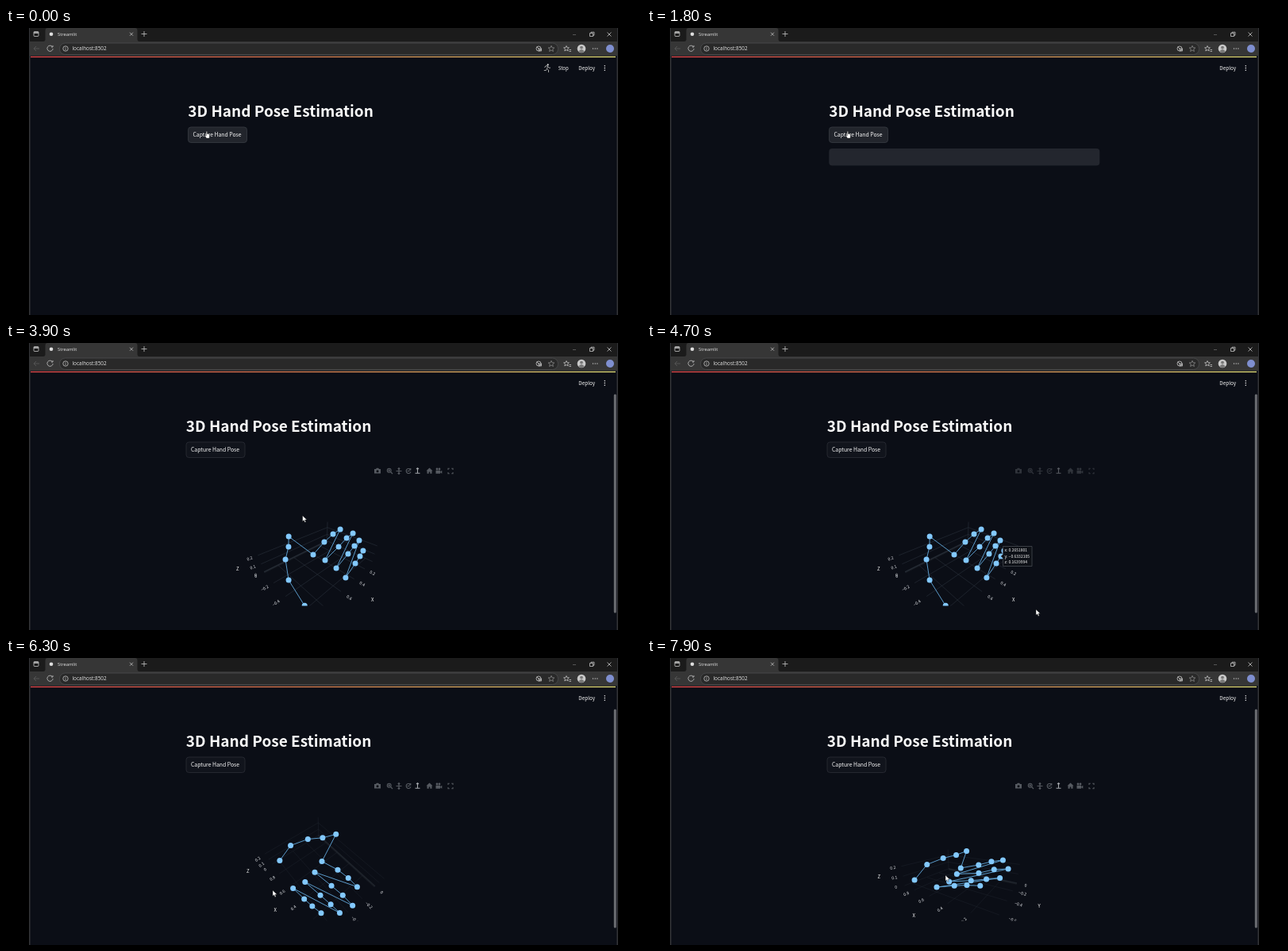
These frames come from a looping animation (800 px wide and 362 px high, 8 s). An HTML page:

```html
<!DOCTYPE html>
<html lang="en">
<head>
<meta charset="utf-8">
<title>3D Hand Pose Estimation</title>
<style>
  html, body { margin: 0; width: 100%; height: 100%; overflow: hidden; background: #000; }
  svg { display: block; width: 800px; height: 362px; }
  text { font-family: "Noto Sans CJK JP", "Noto Sans CJK SC", "Noto Sans CJK", "Open Sans", sans-serif; fill: #fafafa; }
  .ui { font-family: "Open Sans", "Noto Sans", sans-serif; font-size: 5.8px; fill: #e4e4e4; }
  .line { fill: none; stroke: #c4c4c4; stroke-width: .8; }
  .bar .line { stroke: #565a61; stroke-width: 1.1; }
  .bar .solid { fill: #565a61; }
  .tick { font-size: 5.2px; text-anchor: middle; fill: #e4e6ea; }
  .axis { font-size: 6px; text-anchor: middle; }
  .tip text { font-size: 5px; font-weight: 500; }
</style>
</head>
<body>
<svg viewBox="0 0 800 362">
  <defs>
    <linearGradient id="rainbow">
      <stop offset="0" stop-color="#e8494b"/>
      <stop offset=".5" stop-color="#e08552"/>
      <stop offset="1" stop-color="#e6e278"/>
    </linearGradient>
    <clipPath id="scene"><rect x="264" y="201" width="266" height="130.5"/></clipPath>
  </defs>

  <rect width="800" height="362"/>
  <rect x="29" width="742" height="362" fill="#343538"/>
  <rect x="30" width="740" height="18" fill="#1b1b1b"/>
  <rect x="30" y="17" width="740" height="18" fill="#363636"/>
  <path d="M47 17q2.500 0 2.500-3V3q0-3 3-3h110q3 0 3 3v11q0 3 2.500 3z" fill="#363636"/>
  <rect x="30.500" y="35" width="739" height="327" fill="#0b0e16"/>
  <rect x="31" y="35.800" width="737" height="1.300" fill="url(#rainbow)"/>

  <g class="line">
    <rect x="35" y="4.500" width="6" height="6" rx="1"/>
    <path d="M35 6h6" stroke-width="1.600"/>
    <path d="M156 5.700l4 4m0-4l-4 4M170.500 7.500h7M174 4v7"/>
    <path d="M714 8.500h4" stroke="#666"/>
    <path d="M735.500 6.500h4v4h-4zM737 6.500v-1.300h4v4h-1.500M757.500 5.500l5 5m0-5l-5 5"/>
    <path d="M42 26h-7m3-3l-3 3 3 3" stroke="#5c5c5c"/>
    <path d="M58.300 23.500a3.600 3.600 0 1 0 .8 2.500M59 22v2h-2"/>
  </g>
  <circle cx="57" cy="7.800" r="2.300" fill="#dedede"/>
  <text class="ui" x="65" y="10">Streamlit</text>
  <rect x="67.500" y="19" width="628" height="14.500" rx="7" fill="#292929" stroke="#4c4d4f" stroke-width=".8"/>
  <g class="line">
    <circle cx="75" cy="26" r="3.200"/><path d="M75 25.500v2.200M75 24v.7"/>
    <circle cx="671" cy="26" r="3"/><path d="M668.800 23.800l4.400 4.400M671 26h3.500v3h-3.500z"/>
    <path d="M687 22.300l1.100 2.500 2.700.2-2.100 1.800.7 2.700-2.400-1.500-2.400 1.500.7-2.700-2.100-1.800 2.700-.2z" stroke="#888"/>
    <path d="M706 22.500l1 2.200 2.400.2-1.800 1.600.6 2.400-2.200-1.300-2.200 1.300.6-2.400-1.800-1.600 2.400-.2zM709.500 27.500h2.500m-2.500 2h2.500"/>
  </g>
  <text class="ui" x="83.500" y="28" style="font-size:6.400px">localhost:8502</text>
  <circle cx="725" cy="26" r="5.300" fill="#c9c9c9"/>
  <circle cx="725" cy="24.600" r="1.900" fill="#777"/>
  <path d="M721.300 29.500q3.700-5 7.400 0q-3.700 3-7.400 0z" fill="#777"/>
  <path d="M739.500 26h.01m2.700 0h.01m2.700 0h.01" stroke="#ccc" stroke-width="1.300" stroke-linecap="round"/>
  <circle cx="761" cy="26" r="5" fill="#7f8fd0"/>

  <g id="status">
    <circle cx="682.700" cy="46.400" r="1.100" fill="#ddd"/>
    <path class="line" d="M678.500 50l1.500-2.200 2.700.2-1.200 3.500 2 1.500v3M681.300 51.500l-1 2h-2.500M682.800 48.500l1.200 1.700h2"/>
    <text x="695.700" y="52.700" font-size="6.100" font-weight="500">Stop</text>
  </g>
  <text x="721.300" y="52.700" font-size="6.400" font-weight="500">Deploy</text>
  <path d="M754.300 47.800v.01m0 2.700v.01m0 2.700v.01" stroke="#eee" stroke-width="1.500" stroke-linecap="round"/>
  <rect id="scroll" x="765.800" y="64.500" width="3" height="276" rx="1.500" fill="#6b6d72"/>

  <g id="column">
    <text x="229.300" y="111.700" font-size="19" font-weight="700">3D Hand Pose Estimation</text>
    <rect id="button" x="229.500" y="125" width="74" height="19.500" rx="3.500" stroke-width=".8"/>
    <text x="235.500" y="137.200" font-size="6.850" font-weight="500">Capture Hand Pose</text>
  </g>
  <rect id="skeleton" x="229.300" y="152" width="341" height="21.500" rx="4" fill="#23262e"/>

  <g id="bar" class="bar">
    <path class="solid" d="M464 159h2l.8-1.200h2.400l.8 1.200h2v5.500h-8z"/><circle cx="468" cy="161.700" r="1.500" fill="#0b0e16"/>
    <circle class="line" cx="482.700" cy="160.700" r="2.400"/><path class="line" d="M484.500 162.500l2.500 2.500M481.300 160.700h2.800M482.700 159.300v2.800"/>
    <path class="line" d="M491.500 161.500h7M495 158v7M493.700 159.200l1.300-1.500 1.300 1.500M493.700 163.800l1.300 1.500 1.300-1.500"/>
    <path class="line" d="M509.500 159.500a3 3 0 1 0 .5 3M509.800 158v2h-2M505.500 161.500h3"/>
    <path class="line" style="stroke:#a5a8ad" d="M518.500 157.700v6M515.500 164.300h6M517 159l1.500-1.300 1.500 1.300"/>
    <path class="solid" d="M533.500 157.500l4 3.700h-1v3.500h-2.200v-2.300h-1.600v2.300h-2.200v-3.500h-1z"/>
    <path class="solid" d="M541.500 160.800h5.500v4h-5.500zM547.300 162l2-1.200v4l-2-1.200z"/><circle class="solid" cx="543" cy="159" r="1.400"/><circle class="solid" cx="546" cy="159" r="1.400"/>
    <path class="line" d="M557 160v-1.700h1.700m2.600 0h1.700v1.700m0 3v1.700h-1.700m-2.600 0h-1.700v-1.700"/>
  </g>

  <g id="chart" clip-path="url(#scene)">
    <path id="zero" fill="none" stroke="#181c23" stroke-width="2.500"/>
    <path id="grid" fill="none" stroke="#2c333d" stroke-width=".7"/>
    <polyline id="bones" fill="none" stroke="#62a9dc" stroke-width=".9"/>
  </g>
  <g id="labels" clip-path="url(#scene)"></g>

  <g id="tip" class="tip">
    <path d="M448.500 256.500h36.500v25h-36.500v-10l-2.500-2.500 2.500-2.500z" fill="#0e1117" stroke="#4d5158" stroke-width=".7"/>
    <text x="450.500" y="263">x: 0.2651801</text>
    <text x="450.500" y="270.700">y: −0.6332105</text>
    <text x="450.500" y="278.300">z: 0.1639994</text>
  </g>

  <path id="hand" d="M252.200 130.500q.9-.6 1.300.4v2.500l2.300.6q.9.300.8 1.300l-.5 3.700h-3.600l-1.900-3q0-1 1-.6l.6.5z" fill="#fff" stroke="#111" stroke-width=".4"/>
  <path id="arrow" d="M0 0v7.300l1.700-1.500 1.200 2.700 1.300-.5-1.200-2.700h2.400z" fill="#fff" stroke="#111" stroke-width=".4"/>
</svg>

<script>
const LOOP = 8000, STEP = 100;
const $ = id => document.getElementById(id);
const rad = Math.PI / 180, half = Math.SQRT1_2;

// 21 joints: right, toward viewer, up; thousandths of the eye distance
const hand = [
  [-99, 402, -82], [-202, 295, 24], [-252, 140, 68], [-255, 9, 94], [-273, -102, 128],
  [-66, -1, 12], [28, -132, 59], [110, -203, 103], [181, -255, 128],
  [32, 50, -7], [154, -91, 34], [232, -168, 80], [299, -227, 101],
  [116, 121, -30], [226, -14, 11], [292, -92, 41], [345, -151, 65],
  [174, 211, -40], [261, 102, 1], [311, 35, 21], [353, -31, 31]
];

// time, yaw, pitch, vertical shift
const orbit = [[5500, 0, 35.3, 0], [6300, 95, 62, -2.5], [7100, 193, 27, .5], [7900, 78.5, 18.5, 1]];
// time, x, y
const pointer = [
  [3400, 253, 134], [4200, 446, 268], [4500, 446, 268], [4700, 490, 336], [4900, 490, 336],
  [5400, 404, 278], [5500, 404, 278], [6300, 336, 293], [7100, 299, 281], [7900, 376, 274]
];

// Half sizes of the axis box, and its ticks
const A = .39, B = .29, C = .12, SCALE = .85;
const ticks = {
  x: [.2, .4, .6, .8].map(v => [v, (v - .494) * SCALE]),
  y: [0, .2, .4, .6].map(v => [-v, (v - .345) * SCALE]),
  z: [0, .1, .2].map(v => [v, v * SCALE - .115])
};

function make(tag, parent, attrs, text) {
  const el = document.createElementNS("http://www.w3.org/2000/svg", tag);
  for (const k in attrs) el.setAttribute(k, attrs[k]);
  if (text !== undefined) el.textContent = text;
  return parent.appendChild(el);
}

const joints = hand.map(() => make("circle", $("chart"), { r: 3.5, fill: "#83c9ff" }));
const tickText = {}, title = {};
for (const k in ticks) {
  tickText[k] = ticks[k].map(([v]) => make("text", $("labels"), { class: "tick" }, String(v).replace("-", "−")));
  title[k] = make("text", $("labels"), { class: "axis" }, k.toUpperCase());
}

function sample(keys, t) {
  if (t <= keys[0][0]) return keys[0].slice(1);
  for (let i = 1; i < keys.length; i++) {
    const [from, to] = [keys[i - 1], keys[i]];
    if (t <= to[0]) {
      const f = (t - from[0]) / (to[0] - from[0]);
      return to.slice(1).map((v, j) => from[j + 1] + (v - from[j + 1]) * f);
    }
  }
  return keys[keys.length - 1].slice(1);
}

function camera(yaw, pitch, dy) {
  const s = Math.sin(yaw * rad), c = Math.cos(yaw * rad);
  const sp = Math.sin(pitch * rad), cp = Math.cos(pitch * rad);
  return (p, q, z) => {
    const side = p * c - q * s, near = q * c + p * s;
    const k = 151 / (1 - near * cp - z * sp);
    return [397 + side * k, 268.5 + dy + (near * sp - z * cp) * k];
  };
}

function put(el, [x, y], angle = 0) {
  el.setAttribute("transform", `translate(${x.toFixed(2)} ${y.toFixed(2)}) rotate(${angle.toFixed(1)}) translate(0 1.9)`);
}

function slant([x0, y0], [x1, y1]) {
  const a = Math.atan((y1 - y0) / (x1 - x0 || .001)) / rad;
  return Math.max(-60, Math.min(60, a));
}

function drawChart(t) {
  const [yaw, pitch, dy] = sample(orbit, t);
  const project = camera(yaw, pitch, dy);
  const box = (a, b, c) => project((b - a) * half, (a + b) * half, c);
  const seg = (p, q) => `M${box(...p)}L${box(...q)}`;
  const th = (yaw + 45) * rad;
  const sa = Math.sign(Math.cos(th)), sb = Math.sign(Math.sin(th));

  const pts = hand.map(p => project(...p.map(v => v / 1000)));
  $("bones").setAttribute("points", pts.join(" "));
  pts.forEach(([x, y], i) => {
    joints[i].setAttribute("cx", x);
    joints[i].setAttribute("cy", y);
  });

  let d = "";
  for (const [, a] of ticks.x) d += seg([a, -B, -C], [a, B, -C]);
  for (const [, b] of ticks.y) d += seg([-A, b, -C], [A, b, -C]);
  for (const [, c] of ticks.z) d += seg([-A, -sb * B, c], [A, -sb * B, c]) + seg([-sa * A, -B, c], [-sa * A, B, c]);
  d += seg([-sa * A, -sb * B, -C], [-sa * A, -sb * B, C]);
  $("grid").setAttribute("d", d);
  $("zero").setAttribute("d", seg([-A, -B, -C], [A, -B, -C]));
  $("grid").style.opacity = t < 3600 ? .2 : t < 5500 ? .8 : .4;

  ticks.x.forEach(([, a], i) => {
    const at = box(a, sb * B, -C), out = box(a, sb * (B + .07), -C);
    put(tickText.x[i], out, slant(at, out));
  });
  ticks.y.forEach(([, b], i) => {
    const at = box(sa * A, b, -C), out = box(sa * (A + .07), b, -C);
    put(tickText.y[i], out, slant(at, out));
  });
  put(title.x, box(0, sb * (B + .19), -C));
  put(title.y, box(sa * (A + .18), 0, -C));

  // The vertical axis stands at the leftmost corner, its labels square to it
  const upright = c => box(sb * A, -sa * B, c);
  const [x0, y0] = upright(-C), [x1, y1] = upright(C);
  const len = Math.hypot(x1 - x0, y1 - y0);
  const beside = (c, gap) => {
    const [x, y] = upright(c);
    return [x + (y1 - y0) / len * gap, y - (x1 - x0) / len * gap];
  };
  ticks.z.forEach(([, c], i) => put(tickText.z[i], beside(c, 11), slant(upright(c), beside(c, 11))));
  put(title.z, beside(0, 30));
}

function show(id, on) { $(id).style.display = on ? "" : "none"; }

function draw(t) {
  const ready = t >= 2200, over = t <= 3400;
  show("status", t < 1600);
  show("skeleton", t >= 1500 && !ready);
  for (const id of ["chart", "labels", "scroll"]) show(id, ready);
  show("bar", t >= 3900);
  $("bar").style.opacity = t >= 4600 && t < 5000 ? .5 : 1;
  show("tip", t >= 4200 && t < 4800);
  show("hand", over);
  show("arrow", !over);
  $("column").setAttribute("transform", `translate(${ready ? -2.5 : 0} 0)`);
  $("button").setAttribute("fill", over ? "#22252c" : "#11141c");
  $("button").setAttribute("stroke", over ? "#383b43" : "#2b2e36");
  $("arrow").setAttribute("transform", `translate(${sample(pointer, t)})`);
  if (ready) drawChart(t);
}

const start = performance.now();
function frame() {
  const t = (performance.now() - start) % LOOP;
  draw(Math.floor(t / STEP) * STEP);
  requestAnimationFrame(frame);
}
frame();
</script>
</body>
</html>
```
